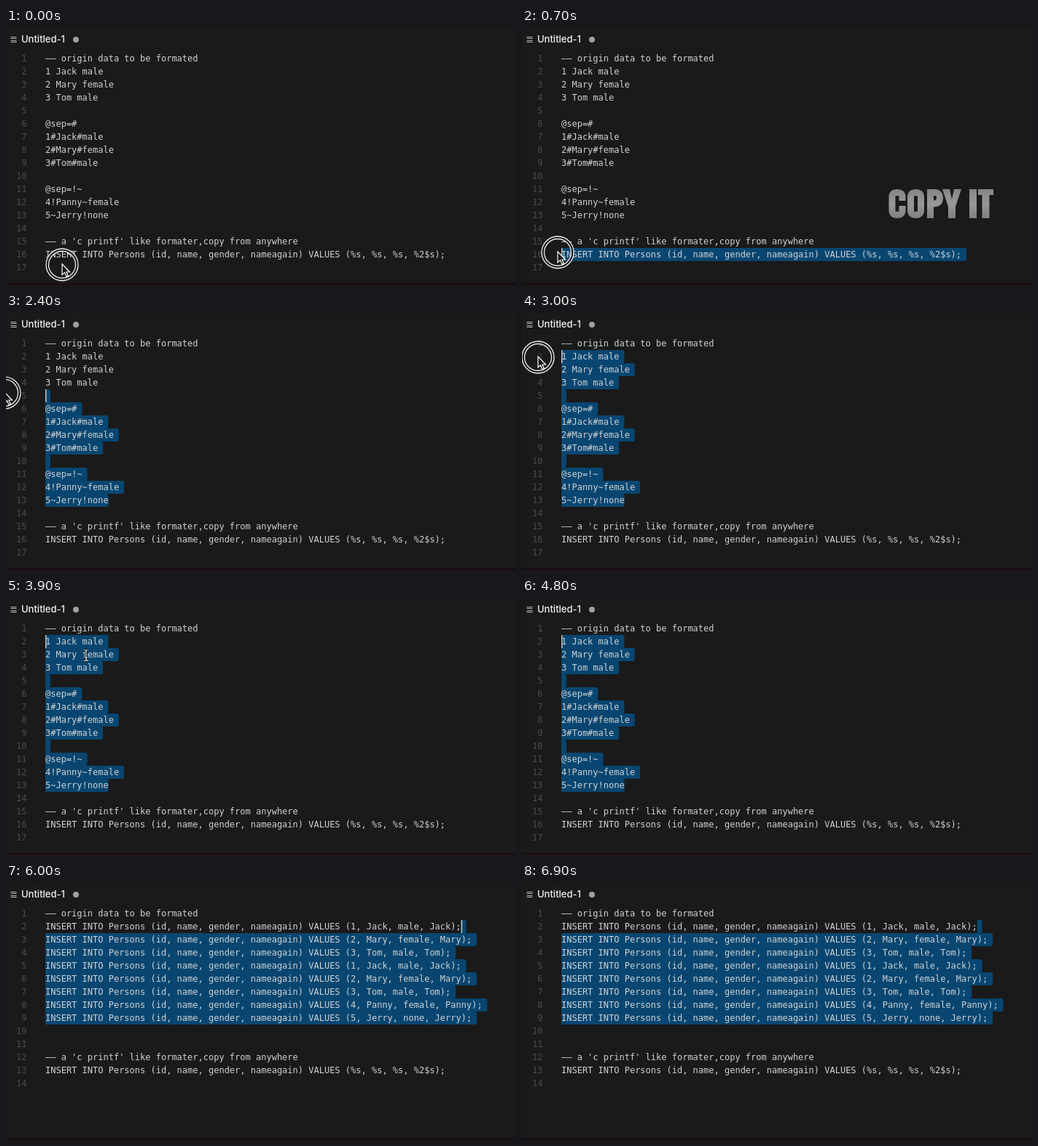
Recreate the animation shown at these times as an HTML page. Size 700 by 354 pixels, loop 7000 ms.

```html
<!DOCTYPE html>
<html lang="en">
<head>
<meta charset="utf-8">
<title>Editor</title>
<style>
  html, body { margin: 0; width: 100%; height: 100%; overflow: hidden; background: #1a1a1a; }
  svg { display: block; width: 700px; height: 354px; }
  .code text { font: 12px "DejaVu Sans Mono", monospace; fill: #d0d2d3; white-space: pre; }
  .code .num { fill: #4b4b4b; text-anchor: end; }
  .title { font: 500 13px Inter, sans-serif; fill: #f4f4f4; }
</style>
</head>
<body>
<svg viewBox="0 0 700 354" xmlns="http://www.w3.org/2000/svg">
  <defs>
    <linearGradient id="steel" gradientUnits="userSpaceOnUse" x1="0" y1="222" x2="0" y2="262">
      <stop offset="0" stop-color="#a9a9a9"/>
      <stop offset=".5" stop-color="#c2c2c2"/>
      <stop offset="1" stop-color="#a2a2a2"/>
    </linearGradient>
  </defs>
  <rect width="700" height="354" fill="#1a1a1a"/>
  <rect y="351" width="700" height="3" fill="#190f13"/>
  <path d="M6.5 12.5h8M6.5 14.5h8M6.5 17.5h8M6.5 19.5h8" stroke="#b4b4b4"/>
  <text class="title" x="21" y="20">Untitled-1</text>
  <circle cx="96" cy="16" r="4" fill="#a0a0a0"/>
  <path id="sel" fill="#084671"/>
  <g id="code" class="code"></g>
  <rect id="caret" width="1.5" height="18" fill="#c4c8ca"/>
  <g id="label" role="img" aria-label="COPY IT" fill="url(#steel)">
    <g fill="none" stroke="url(#steel)" stroke-width="9">
      <path d="M522 238V232.500Q522 226.500 515 226.500T508 232.500V251.500Q508 257.500 515 257.500T522 251.500V245"/>
      <path d="M533.500 232.500Q533.500 226.500 540.500 226.500T547.500 232.500V251.500Q547.500 257.500 540.500 257.500T533.500 251.500Z"/>
      <path d="M560.500 262V226.500H566Q573.500 226.500 573.500 234T566 242H560.500"/>
    </g>
    <path d="M577 222h10l3 14 3-14h10l-8 24v16h-10v-16ZM614 222h10v40h-10ZM626 222h21v8h-5.500v32h-10v-32h-5.500Z"/>
  </g>
  <g id="mouse">
    <g id="ring" fill="none">
      <circle cy="1" r="20.500" stroke="#1a1a1a" stroke-width="4"/>
      <circle cy="1" r="22" stroke="#eee" stroke-width="1.300"/>
      <circle cy="1" r="18.500" stroke="#eee" stroke-width="1.300"/>
    </g>
    <path id="arrow" d="M0 0V15L3.500 11.800 6 17.500 8.300 16.500 5.900 11H10.500Z" fill="#111" stroke="#fff" stroke-width="1.200"/>
    <g id="beam" fill="none">
      <path d="M-3-7.500Q0-7.500 0-5.500Q0-7.500 3-7.500M0-5.500V5.500M-3 7.500Q0 7.500 0 5.500Q0 7.500 3 7.500M-2 3H2" stroke="#111" stroke-width="3"/>
      <path d="M-3-7.500Q0-7.500 0-5.500Q0-7.500 3-7.500M0-5.500V5.500M-3 7.500Q0 7.500 0 5.500Q0 7.500 3 7.500M-2 3H2" stroke="#e2e2e2" stroke-width="1.200"/>
    </g>
  </g>
</svg>
<script>
const LOOP = 7000, STEP = 100, LEFT = 54, TOP = 33, ROW = 18, CHAR = 7.224;
const $ = id => document.getElementById(id);
const clamp = (v, a, b) => Math.min(b, Math.max(a, v));

const insert = values => `INSERT INTO Persons (id, name, gender, nameagain) VALUES (${values});`;
const people = ["1 Jack male", "2 Mary female", "3 Tom male"];
const extra = ["4 Panny female", "5 Jerry none"];
const head = "–– origin data to be formated";
const tail = ["", "–– a 'c printf' like formater,copy from anywhere", insert("%s, %s, %s, %2$s"), ""];
const fill = person => {
  const [id, name, gender] = person.split(" ");
  return insert([id, name, gender, name].join(", "));
};
const before = [head, ...people, "", "@sep=#", ...people.map(p => p.replaceAll(" ", "#")),
  "", "@sep=!~", "4!Panny~female", "5~Jerry!none", ...tail];
const after = [head, ...[...people, ...people, ...extra].map(fill), "", ...tail];

// Pointer path: time, x, y
const path = [
  [0, 77, 325], [150, 77, 325], [450, 47, 312], [700, 49, 308], [900, 49, 308],
  [1400, 112, 284], [1900, 156, 266], [2000, 156, 262], [2400, -2, 109],
  [2800, 18, 60], [3200, 26, 60], [3400, 26, 60], [3800, 110, 79], [LOOP, 110, 79]
];

function pointer(t) {
  const i = path.findIndex(k => k[0] > t);
  const a = path[i - 1], b = path[i];
  const u = (t - a[0]) / (b[0] - a[0]), e = u * u * (3 - 2 * u);
  return [a[1] + (b[1] - a[1]) * e, a[2] + (b[2] - a[2]) * e];
}

// Text position under a point: zero-based row and column
function locate([x, y], doc) {
  const row = clamp(Math.floor((y - TOP) / ROW), 0, doc.length - 1);
  return [row, clamp(Math.round((x - LEFT) / CHAR), 0, doc[row].length)];
}

// Selection ends, with the caret first, and the time of its last change
function selection(t) {
  if (t >= 5000) return { from: [1, after[1].length], to: [9, 0], since: 5000 };
  if (t >= 2000) {
    return { from: locate(pointer(Math.min(t, 2800)), before), to: [12, 12], since: Math.min(t, 2800) };
  }
  const from = locate(pointer(Math.min(t, 700)), before);
  return from[0] < 16 ? { from: [15, 0], to: [16, 0], since: 500 } : null;
}

function selectionPath({ from, to }, doc) {
  let d = "";
  for (let r = from[0]; r <= to[0]; r++) {
    const a = LEFT + (r === from[0] ? from[1] * CHAR : 0);
    const b = LEFT + (r === to[0] ? to[1] * CHAR : doc[r].length * CHAR + 7);
    if (b - a < 3) continue;
    d += `M${a} ${TOP + r * ROW}H${b - 3}q3 0 3 3v12q0 3-3 3H${a}Z`;
  }
  return d;
}

let shown;
function showDoc(doc) {
  if (doc === shown) return;
  shown = doc;
  $("code").innerHTML = doc.map((line, i) => {
    const y = TOP + 13 + i * ROW;
    return `<text class="num" x="28.500" y="${y}">${i + 1}</text><text x="${LEFT}" y="${y}">${line}</text>`;
  }).join("");
}

const show = (id, on) => $(id).setAttribute("visibility", on ? "visible" : "hidden");

function draw(time) {
  const t = Math.floor((time % LOOP) / STEP) * STEP;
  const doc = t < 5000 ? before : after;
  showDoc(doc);

  const sel = selection(t);
  $("sel").setAttribute("d", sel ? selectionPath(sel, doc) : "");
  show("caret", sel && (t - sel.since) % 1000 < 500);
  if (sel) {
    $("caret").setAttribute("x", LEFT + sel.from[1] * CHAR);
    $("caret").setAttribute("y", TOP + sel.from[0] * ROW);
  }

  $("label").setAttribute("opacity", clamp((t - 400) / 400, 0, 1) * clamp((2300 - t) / 300, 0, 1));

  const [x, y] = pointer(t);
  const pressed = t < 900 || (t >= 2000 && t < 3300);
  const visible = t < 4200, arrow = pressed || x < 50;
  $("mouse").setAttribute("transform", `translate(${x} ${y})`);
  show("ring", visible && pressed);
  show("arrow", visible && arrow);
  show("beam", visible && !arrow);
}

const start = performance.now();
function tick() {
  draw(performance.now() - start);
  requestAnimationFrame(tick);
}
tick();
</script>
</body>
</html>
```
